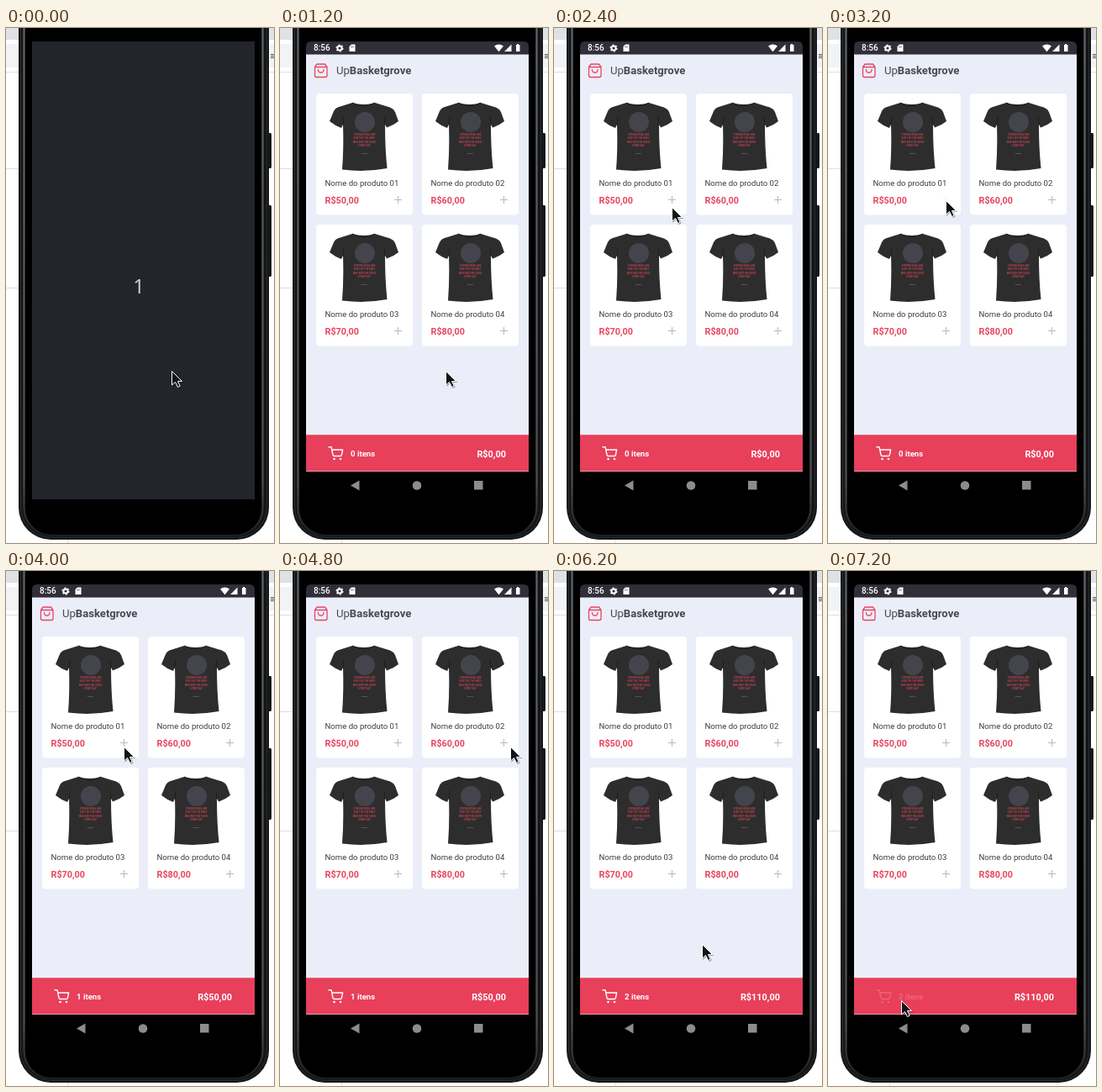
Write an HTML page that moves like this. It is 319 by 613 pixels and loops after 8000 ms.

```html
<!DOCTYPE html>
<html lang="pt-BR">
<head>
<meta charset="utf-8">
<title>Shop app</title>
<style>
  html, body { margin: 0; width: 100%; height: 100%; overflow: hidden; background: #fff; }
  svg { display: block; width: 319px; height: 613px; font-family: Roboto, sans-serif; }
  .bold { font-weight: 700; }
  .name { font-size: 9.6px; fill: #3d3d45; }
  .price { font-size: 10.8px; font-weight: 700; fill: #e8455f; }
  .plus { fill: none; stroke: #b9b9be; stroke-width: 1; }
  .line { fill: none; stroke-linecap: round; stroke-linejoin: round; }
  .print { font-size: 2.8px; font-weight: 700; fill: #b8424e; text-anchor: middle; }
  .count { font-size: 9.6px; font-weight: 700; fill: #fff; }
  .total { font-size: 10.9px; font-weight: 700; fill: #fff; text-anchor: end; }

  .splash, .press1, .press2, .state, .cart, .cursor {
    animation: 8s step-end infinite;
  }
  .splash { animation-name: splash; }
  .press1 { animation-name: press1; }
  .press2 { animation-name: press2; }
  .none { animation-name: none-in-cart; }
  .one { animation-name: one-in-cart; }
  .two { animation-name: two-in-cart; }
  .cart { animation-name: tap-cart; }
  .cursor { animation-name: move; filter: drop-shadow(1px 1px .7px #0005); }

  @keyframes splash { 0% { opacity: 1 } 15%, 100% { opacity: 0 } }
  @keyframes press1 { 0%, 45%, 100% { opacity: 1 } 40% { opacity: .1 } }
  @keyframes press2 { 0%, 76.25%, 100% { opacity: 1 } 70% { opacity: .1 } }
  @keyframes none-in-cart { 0% { opacity: 1 } 43.75%, 100% { opacity: 0 } }
  @keyframes one-in-cart { 0%, 73.75%, 100% { opacity: 0 } 43.75% { opacity: 1 } }
  @keyframes two-in-cart { 0% { opacity: 0 } 73.75%, 100% { opacity: 1 } }
  @keyframes tap-cart { 0% { opacity: 1 } 90%, 100% { opacity: .2 } }
  @keyframes move {
    0% { transform: translate(198px, 408px) }
    21.25% { transform: translate(194px, 398px) }
    22.5% { transform: translate(169px, 357px) }
    23.75% { transform: translate(127px, 300px) }
    25% { transform: translate(100px, 258px) }
    26.25% { transform: translate(104px, 237px) }
    27.5% { transform: translate(118px, 224px) }
    28.75% { transform: translate(132px, 216px) }
    30% { transform: translate(141px, 213px) }
    35% { transform: translate(141px, 205px) }
    50% { transform: translate(141px, 209px) }
    56.25% { transform: translate(218px, 212px) }
    57.5% { transform: translate(275px, 213px) }
    60% { transform: translate(275px, 209px) }
    61.25% { transform: translate(274px, 204px) }
    62.5% { transform: translate(272px, 199px) }
    63.75% { transform: translate(270px, 196px) }
    65% { transform: translate(268px, 195px) }
    66.25% { transform: translate(267px, 198px) }
    67.5% { transform: translate(266px, 201px) }
    76.25% { transform: translate(228px, 340px) }
    77.5% { transform: translate(177px, 444px) }
    78.75% { transform: translate(146px, 476px) }
    80% { transform: translate(122px, 494px) }
    81.25% { transform: translate(105px, 504px) }
    82.5% { transform: translate(94px, 509px) }
    83.75%, 100% { transform: translate(88px, 511px) }
  }
</style>
</head>
<body>
<svg viewBox="0 0 319 613">
  <defs>
    <linearGradient id="rim" x2="0" y2="1">
      <stop offset="0" stop-color="#63686c"/>
      <stop offset=".9" stop-color="#4d5154"/>
      <stop offset="1" stop-color="#1c1d1e"/>
    </linearGradient>
    <path id="plus" class="plus" d="M97.5 122v9M93 126.5h9"/>
    <g id="card">
      <rect width="115" height="144.5" rx="4" fill="#fff"/>
      <path fill="#2d2d2e" d="M43 11Q57 15 70 11L88 16.500Q92 18 94 22L98 33Q92 38 84 40.500L82 37Q82 65 84.500 89Q58 94 31 90.500Q33 65 32 37L30 41Q22 38 16 33L21 21Q23 17 27 16Z"/>
      <path fill="none" stroke="#1d1d1e" d="M43 11Q57 19 70 11M32 37L33 27M82 37L81 27"/>
      <circle cx="58" cy="34" r="12" fill="#44454c"/>
      <g class="print">
        <text x="57.500" y="49.500">STRONG IDEAS ARE</text>
        <text x="57.500" y="54">BUILT BY THE ONES</text>
        <text x="57.500" y="58.500">WHO KEEP ON GOING</text>
        <text x="57.500" y="63">EVERY DAY</text>
        <text x="57.500" y="71.500" fill="#77777c" font-size="2.400">always</text>
      </g>
    </g>
  </defs>

  <!-- page behind the phone -->
  <rect width="319" height="613" fill="#fff"/>
  <path fill="#dee1e6" d="M0 0h319v14H0z"/>
  <path fill="#f1f3f4" d="M0 19h319v28H0z"/>
  <path stroke="#dcdee1" d="M0 52.5h319M0 167.5h15M0 309.5h15M73.5 608v5"/>
  <path stroke="#555" d="M315 31.5h4M315 33.5h4M315 35.5h4"/>

  <!-- phone -->
  <path fill="#17181a" d="M311 125h4q1 0 1 2v38q0 2-1 2h-4zM311 211h4q1 0 1 2v81q0 2-1 2h-4z"/>
  <rect x="15" y="-60" width="298" height="669" rx="38" fill="#141516"/>
  <rect x="17.500" y="-60" width="293" height="666.500" rx="36" fill="none" stroke="#2a2c2e"/>
  <rect x="21.500" y="-60" width="284" height="664" rx="33" fill="#000" stroke="url(#rim)" stroke-width="2.200"/>

  <!-- app -->
  <path fill="#ebeef8" d="M31 31h265v497H31z"/>
  <path fill="#312e38" d="M31 31.500V22q0-6 6-6h253q6 0 6 6v9.500z"/>
  <text x="40" y="27.300" font-size="10" font-weight="500" fill="#fff">8:56</text>
  <circle cx="71" cy="24" r="2.600" fill="none" stroke="#fff" stroke-width="2"/>
  <circle cx="71" cy="24" r="3.900" fill="none" stroke="#fff" stroke-width="1.300" stroke-dasharray="2 2.080"/>
  <path fill="#fff" d="M85 19.5h4.5v8.5h-7v-6zM255 21.5q5.500-4 11 0l-5.500 6.700zM275.500 19.500v8.500h-8.500zM281 20h1v-1h2v1h1.500v8H281z"/>
  <path stroke="#312e38" stroke-width=".8" d="M85 21.500v2M87 21.500v2"/>

  <g class="line" stroke="#e8455f" stroke-width="1.300">
    <path d="M44 43h9.500l2.500 3.500v10q0 2-2 2H43.500q-2 0-2-2v-10zM41.500 46.500H56M52 49.500q0 3.500-3.300 3.500t-3.300-3.500"/>
  </g>
  <text x="67" y="55.200" font-size="13.100" fill="#484852">Up<tspan class="bold">Basketgrove</tspan></text>

  <g transform="translate(43 78)">
    <use href="#card"/>
    <text class="name" x="10.500" y="110">Nome do produto 01</text>
    <text class="price" x="10.500" y="131">R$50,00</text>
    <use class="press1" href="#plus"/>
  </g>
  <g transform="translate(169 78)">
    <use href="#card"/>
    <text class="name" x="10.500" y="110">Nome do produto 02</text>
    <text class="price" x="10.500" y="131">R$60,00</text>
    <use class="press2" href="#plus"/>
  </g>
  <g transform="translate(43 234)">
    <use href="#card"/>
    <text class="name" x="10.500" y="110">Nome do produto 03</text>
    <text class="price" x="10.500" y="131">R$70,00</text>
    <use href="#plus"/>
  </g>
  <g transform="translate(169 234)">
    <use href="#card"/>
    <text class="name" x="10.500" y="110">Nome do produto 04</text>
    <text class="price" x="10.500" y="131">R$80,00</text>
    <use href="#plus"/>
  </g>

  <!-- cart bar -->
  <path fill="#e83f5b" d="M31 484.300h265v43.200H31z"/>
  <g class="cart">
    <g class="line" stroke="#fff" stroke-width="1.400">
      <path d="M58 498.700h3l2 9.500q.300 1.300 1.600 1.300h7.200q1.300 0 1.600-1.300l1.200-6.200H61.800"/>
      <circle cx="64.500" cy="513" r=".6"/>
      <circle cx="72" cy="513" r=".6"/>
    </g>
    <g class="count">
      <text class="state none" x="84" y="510.300">0 itens</text>
      <text class="state one" x="84" y="510.300">1 itens</text>
      <text class="state two" x="84" y="510.300">2 itens</text>
    </g>
  </g>
  <g class="total">
    <text class="state none" x="269" y="510.600">R$0,00</text>
    <text class="state one" x="269" y="510.600">R$50,00</text>
    <text class="state two" x="269" y="510.600">R$110,00</text>
  </g>

  <!-- navigation bar -->
  <path fill="#000" d="M31 528h265v33H31z"/>
  <path fill="#8c8c8c" d="M84 544.500l10.500-6v12zM231 539h10.500v10.500H231z"/>
  <circle cx="163" cy="544.500" r="5.300" fill="#8c8c8c"/>

  <g class="splash">
    <path fill="#22252c" d="M31 16h265v545H31z"/>
    <text x="158" y="316" font-family="'Noto Sans', sans-serif" font-size="24" fill="#c9cad0" text-anchor="middle">1</text>
  </g>

  <path class="cursor" fill="#121316" stroke="#fff" d="M-.5 .500V17L3.500 13.500L6.500 19.500L9.200 18.300L6.500 12.500H11.500Z"/>
</svg>
</body>
</html>
```
